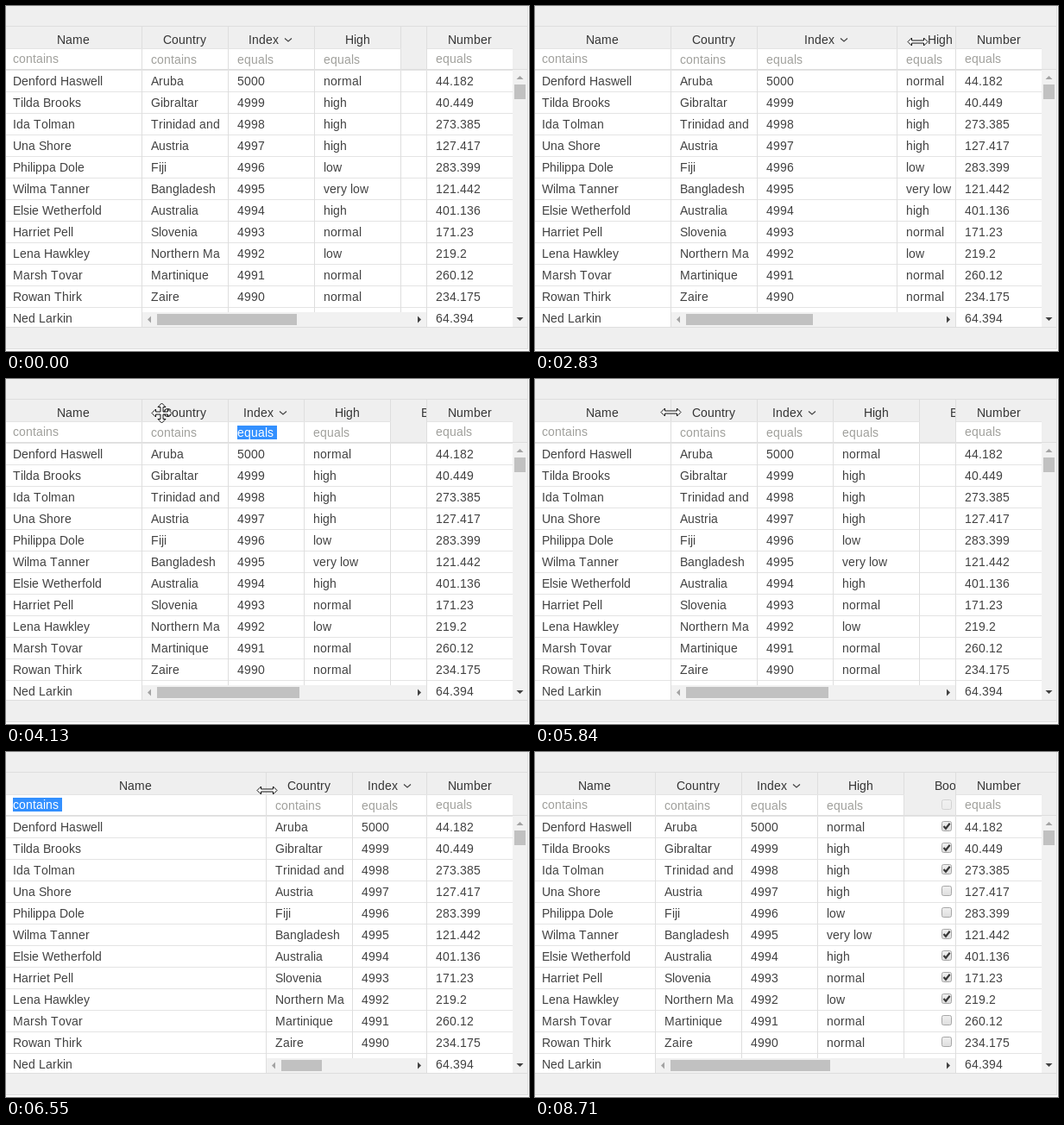
Animation of 606 by 400 pixels, one loop 9.73 s. Source, as an HTML page with a canvas:

```html
<!DOCTYPE html>
<html lang="en">
<head>
<meta charset="utf-8">
<title>Resizable grid columns</title>
<style>
html, body { margin: 0; width: 100%; height: 100%; overflow: hidden; background: #fff; }
canvas { display: block; }
</style>
</head>
<body>
<canvas id="stage" width="606" height="400"></canvas>
<script>
const ctx = document.getElementById('stage').getContext('2d');
const LOOP = 9730, STEP = 77;
const RIGHT = 488, ROW = 25, BODY = 74, BOTTOM = 372;
const PANEL = '#efefef', LINE = '#e4e4e4', EDGE = '#dedede';

const rows = [
  ['Denford Haswell', 'Aruba', 'normal', '44.182', true],
  ['Tilda Brooks', 'Gibraltar', 'high', '40.449', true],
  ['Ida Tolman', 'Trinidad and Tobago', 'high', '273.385', true],
  ['Una Shore', 'Austria', 'high', '127.417', false],
  ['Philippa Dole', 'Fiji', 'low', '283.399', false],
  ['Wilma Tanner', 'Bangladesh', 'very low', '121.442', true],
  ['Elsie Wetherfold', 'Australia', 'high', '401.136', true],
  ['Harriet Pell', 'Slovenia', 'normal', '171.23', true],
  ['Lena Hawkley', 'Northern Mariana Islands', 'low', '219.2', true],
  ['Marsh Tovar', 'Martinique', 'normal', '260.12', false],
  ['Rowan Thirk', 'Zaire', 'normal', '234.175', false],
  ['Ned Larkin', 'Austria', 'high', '64.394', true]
];

const mix = (a, b, p) => a + (b - a) * p;

// Out-and-back movement, farthest at the given peak
function swing(p, from, to, reach, peak = 0.5, power = 1) {
  const wave = Math.sin(Math.PI * p ** (Math.log(0.5) / Math.log(peak)));
  return mix(from, to, p) + reach * Math.max(0, wave) ** power;
}

// Each gesture maps its progress to the parts of the state it changes
const gestures = [
  { start: 140, end: 900, act: p => ({ kind: 'arrow', x: swing(p, 425, 360, 12), y: swing(p, 0, 41, 106, 0.4) }) },
  { start: 1140, end: 1670, act: p => ({ x: mix(359, 360, p), y: 37 }) },
  { start: 1820, end: 2120, act: p => ({ kind: 'resize', x: mix(358, 357, p), y: 36 }) },
  { start: 2430, end: 3600, act: p => ({
    indexW: swing(p, 100, 88, 76.8), x: swing(p, 357, 343, 105.5),
    y: swing(p, 37, 38, 4), indexSelected: p > 0.85
  }) },
  { start: 3830, end: 4440, act: p => ({ kind: 'move', x: mix(157, 343, (1 - p) ** 3), y: mix(38, 40, p) }) },
  { start: 4750, end: 4970, act: p => ({ x: mix(166, 162, p), y: 40 }) },
  { start: 5140, end: 5140, act: () => ({ kind: 'arrow', x: 158 }) },
  { start: 5450, end: 5450, act: () => ({ kind: 'resize' }) },
  { start: 5840, end: 5840, act: () => ({ x: 157, y: 38, indexSelected: false }) },
  { start: 5990, end: 7410, act: p => ({
    nameW: swing(p, 158, 140, 151, 0.38, 1.6), x: swing(p, 157, 140, 151, 0.38, 3.4),
    y: swing(p, 38, 44, 4), nameSelected: p > 0.05 && p < 0.72
  }) },
  { start: 7790, end: 8100, act: p => ({ kind: p < 1 ? 'arrow' : '', x: mix(150, 435, p), y: mix(47, 137, p) }) },
  { start: 8340, end: 8710, act: p => ({ kind: p < 1 ? 'arrow' : '', x: mix(531, 606, p), y: mix(310, 400, p) }) }
];

function stateAt(t) {
  const state = { nameW: 158, indexW: 100, x: 0, y: 0, kind: '' };
  for (const { start, end, act } of gestures) {
    if (t < start) break;
    const stepped = Math.floor((t - start) / STEP + 0.15) * STEP;
    Object.assign(state, act(t >= end ? 1 : Math.min(1, stepped / (end - start))));
  }
  for (const key of ['nameW', 'indexW', 'x', 'y']) state[key] = Math.round(state[key]);
  return state;
}

function box(x, y, w, h, color) {
  ctx.fillStyle = color;
  ctx.fillRect(x, y, w, h);
}

// Glyphs advance by whole pixels, as in hinted screen text
const advance = glyph => Math.round(ctx.measureText(glyph).width);
const textWidth = text => [...text].reduce((sum, glyph) => sum + advance(glyph), 0);

function label(text, x, y, color = '#424242') {
  ctx.fillStyle = color;
  for (const glyph of text) {
    ctx.fillText(glyph, x, y);
    x += advance(glyph);
  }
}

function clipped(x, y, w, h, draw) {
  ctx.save();
  ctx.beginPath();
  ctx.rect(x, y, w, h);
  ctx.clip();
  draw();
  ctx.restore();
}

function line(points, width, color) {
  ctx.beginPath();
  points.forEach(([x, y]) => ctx.lineTo(x, y));
  ctx.lineWidth = width;
  ctx.strokeStyle = color;
  ctx.stroke();
}

function polygon(points, fill, stroke) {
  ctx.beginPath();
  points.forEach(([x, y]) => ctx.lineTo(x, y));
  ctx.closePath();
  ctx.fillStyle = fill;
  ctx.fill();
  if (!stroke) return;
  ctx.strokeStyle = stroke;
  ctx.lineWidth = 1;
  ctx.stroke();
}

function triangle(x, y, angle, color) {
  ctx.save();
  ctx.translate(x, y);
  ctx.rotate(angle);
  polygon([[-4, 2], [0, -2], [4, 2]], color);
  ctx.restore();
}

function checkbox(x, y, checked, disabled) {
  const shade = ctx.createLinearGradient(0, y, 0, y + 12);
  shade.addColorStop(0, '#f1f1f1');
  shade.addColorStop(1, disabled ? '#ececec' : '#dddddd');
  ctx.beginPath();
  ctx.roundRect(x + 0.5, y + 0.5, 11, 11, 2);
  ctx.fillStyle = shade;
  ctx.fill();
  ctx.lineWidth = 1;
  ctx.strokeStyle = disabled ? '#d2d2d2' : '#a6a6a6';
  ctx.stroke();
  if (checked) line([[x + 2.5, y + 6], [x + 5, y + 8.7], [x + 9.7, y + 2.8]], 2.2, '#383838');
}

function header(title, x, w, sorted) {
  const width = textWidth(title);
  const left = Math.floor(x + (w - 1) / 2 - (width + (sorted ? 18 : 0)) / 2);
  label(title, left, 44, '#363636');
  if (!sorted) return;
  const tip = left + width + 11;
  line([[tip - 4, 37.5], [tip, 41], [tip + 4, 37.5]], 1.2, '#444');
}

function filter(text, x, y, selected) {
  if (selected) box(x, y - 13, textWidth(text + ' '), 16, '#3390ff');
  label(text, x, y, selected ? '#fff' : '#a0a09c');
}

function column(x, w, pad, title, hint, values, options = {}) {
  box(x, 50, w, 23, '#fff');
  header(title, x, w, options.sorted);
  filter(hint, x + pad, options.locked ? 66 : 67, options.selected);
  clipped(x + pad, BODY, w - pad - 10, BOTTOM - BODY, () =>
    values.forEach((value, i) => label(value, x + pad, 92 + i * ROW)));
  box(x + w - 1, 24, 1, BOTTOM - 24, EDGE);
}

function boolColumn(x) {
  header('Bool', x, 100);
  checkbox(x + 43, 55, false, true);
  rows.forEach((row, i) => checkbox(x + 43, 80 + i * ROW, row[4]));
}

function horizontalBar(left, content) {
  const view = RIGHT - left, track = view - 34;
  box(left, 355, view - 1, 17, '#f1f1f1');
  box(left + 17, 357, Math.floor(track * view / content), 13, '#c1c1c1');
  triangle(left + 8, 363.5, -Math.PI / 2, '#a3a3a3');
  triangle(479, 363.5, Math.PI / 2, '#404040');
}

function verticalBar() {
  box(587, BODY, 17, BOTTOM - BODY, '#f1f1f1');
  box(589, 91, 13, 17, '#c1c1c1');
  triangle(595.5, 83, 0, '#a3a3a3');
  triangle(595.5, 363, Math.PI, '#404040');
}

// One arrowhead arm, repeated around the centre
const arm = (half, head) => [[-half, -7], [-head, -7], [0, -11.5], [head, -7], [half, -7]];
const turn = ([x, y]) => [-y, x];
const right = arm(1.5, 4.5).map(turn);
const left = right.map(turn).map(turn);
const up = [[-1.5, -1.5], ...arm(1.5, 4.5)];
const around = (part, count) => count ? [...part, ...around(part.map(turn), count - 1)] : [];
const shapes = {
  arrow: [[0.5, 0.5], [0.5, 16.5], [4, 13], [6.5, 18.5], [8.7, 17.5], [6.4, 12], [11.5, 12]],
  resize: [...right, ...left],
  move: around(up, 4)
};

function pointer({ kind, x, y }) {
  if (!kind) return;
  const shift = kind === 'arrow' ? 0 : 0.5;
  polygon(shapes[kind].map(([dx, dy]) => [x + dx + shift, y + dy + shift]), '#fff', '#111');
}

function draw(time) {
  const state = stateAt(time);
  const { nameW, indexW } = state;
  const indexX = nameW + 100, highX = indexX + indexW, boolX = highX + 100;
  const field = i => rows.map(row => row[i]);

  ctx.font = '14px "Liberation Sans", Arial, sans-serif';
  box(0, 0, 606, 400, '#fff');
  box(0, 0, 604, 397, PANEL);
  box(0, BODY, 587, BOTTOM - BODY, '#fff');
  for (let y = 99; y < BOTTOM; y += ROW) box(0, y, 587, 1, LINE);

  column(0, nameW, 8, 'Name', 'contains', field(0), { locked: true, selected: state.nameSelected });
  clipped(nameW, 24, RIGHT - 1 - nameW, BOTTOM - 24, () => {
    boolColumn(boolX);
    column(nameW, 100, 10, 'Country', 'contains', field(1));
    column(indexX, indexW, 10, 'Index', 'equals', rows.map((row, i) => String(5000 - i)),
      { sorted: true, selected: state.indexSelected });
    column(highX, 100, 10, 'High', 'equals', field(2));
  });
  column(RIGHT, 100, 10, 'Number', 'equals', field(3), { locked: true });
  box(587, 24, 17, 49, PANEL);
  box(RIGHT - 1, 24, 1, BOTTOM - 24, EDGE);

  box(0, 23, 604, 1, EDGE);
  box(0, 49, Math.min(boolX, RIGHT), 1, LINE);
  box(RIGHT, 49, 99, 1, LINE);
  box(0, 73, 604, 1, EDGE);
  box(0, 74, 587, 1, LINE);
  horizontalBar(nameW, 502 + indexW);
  verticalBar();
  box(0, BOTTOM, 604, 1, EDGE);
  box(0, 397, 605, 1, EDGE);
  box(604, 0, 1, 398, EDGE);

  pointer(state);
}

const began = performance.now();
function tick() {
  draw((performance.now() - began) % LOOP);
  requestAnimationFrame(tick);
}
tick();
</script>
</body>
</html>
```
